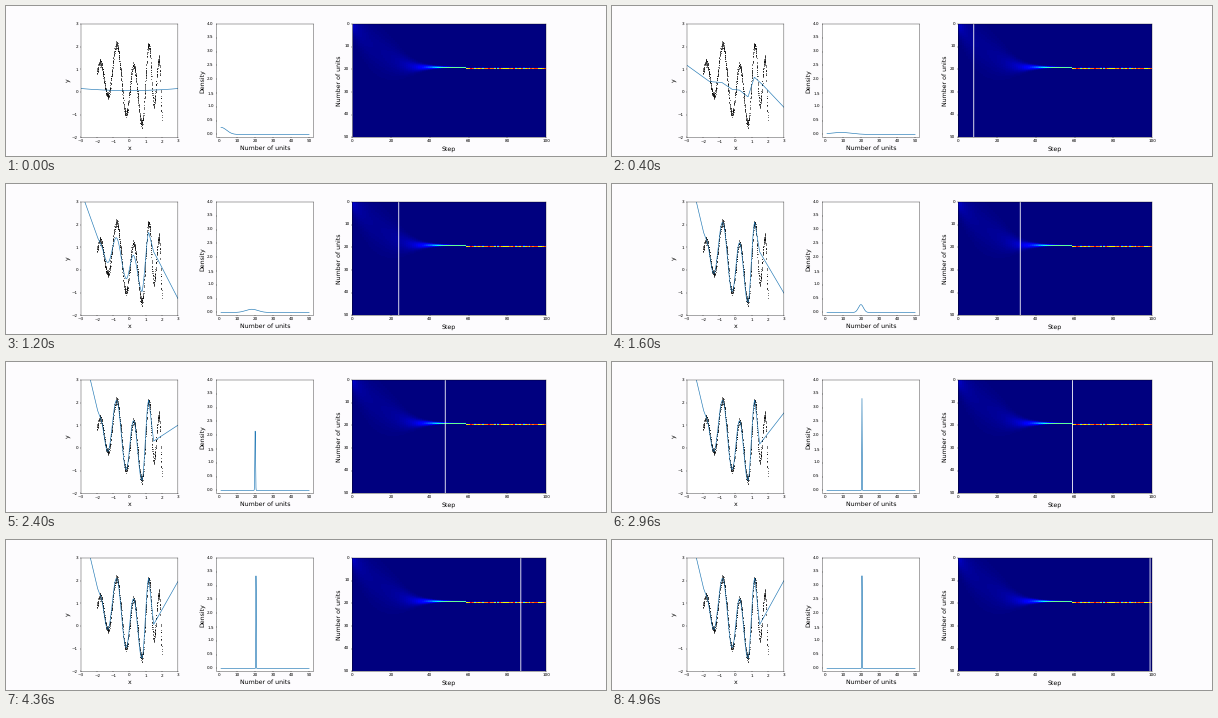
A matplotlib script for the animation above (5 s loop, 600 by 150 pixels).

```python
import math

import matplotlib.pyplot as plt
import numpy as np
from matplotlib.animation import FuncAnimation

STEPS = 100
LOOP_MS = 5000

plt.rcParams.update({
    "font.family": "DejaVu Sans",
    "text.hinting": "none",
    "path.snap": False,
})
rng = np.random.default_rng(4)

# Turning points of the noisy signal
TURNS = [(-2.1, 0.6), (-1.83, 1.35), (-1.34, -0.15), (-0.8, 2.1), (-0.2, -0.95),
         (0.25, 1.2), (0.77, -1.42), (1.2, 2.1), (1.52, -0.55), (1.82, 1.45),
         (2.06, -1.6)]
TURN_X, TURN_Y = np.array(TURNS).T

# Coarse shape reached early in training
ROUGH = [(-3, 2.2), (-1.6, 0.83), (-0.85, 0.78), (-0.2, 0.17), (0.25, 0.1),
         (0.78, -0.5), (1.17, 1.23), (1.65, 0.6), (3, -1.5)]


def signal(x):
    """Half-cosine path through the turning points."""
    i = np.clip(np.searchsorted(TURN_X, x) - 1, 0, len(TURNS) - 2)
    u = (x - TURN_X[i]) / (TURN_X[i + 1] - TURN_X[i])
    return TURN_Y[i] + (TURN_Y[i + 1] - TURN_Y[i]) * (1 - np.cos(np.pi * u)) / 2


def polyline(x, points):
    return np.interp(x, *zip(*points))


grid = np.linspace(-3, 3, 361)
flat = 0.06 + 0.01 * grid ** 2
rough = polyline(grid, ROUGH)


def learned(step):
    """Follows the signal in the middle; the right tail swings up and settles."""
    lag = math.exp(-max(0, step - 32) / 14.7)
    left = [(-3, 4.75), (-1.97, 1.65), (-1.8, 1.34)]
    right = [(1.2, 2.1), (1.5, 0.05 + 0.75 * lag), (3, 2.03 - 3.05 * lag)]
    y = np.where(grid < -1.8, polyline(grid, left), signal(grid))
    return np.where(grid > 1.2, polyline(grid, right), y)


def fit(step):
    early = min(step / 16, 1)
    late = np.clip((step - 16) / 16, 0, 1)
    coarse = flat + early * (rough - flat)
    return coarse + late * (learned(step) - coarse)


units = np.linspace(1, 50, 500)


def density(step):
    """Normal density cut off below one unit."""
    if step < 59:
        mean = 20 - 19 * max(0, 1 - step / 35) ** 2
    else:
        mean = 20.45 + rng.normal(0, 0.025)
    sd = 0.116 + 3 * (1 + step / 6) * math.exp(-(step / 19.5) ** 2)
    mass = 0.5 * (1 + math.erf((mean - 1) / (sd * math.sqrt(2))))
    peak = 1 / (sd * math.sqrt(2 * math.pi) * mass)
    return peak * np.exp(-0.5 * ((units - mean) / sd) ** 2)


densities = np.array([density(s) for s in range(STEPS)])

fig, (ax_fit, ax_den, ax_map) = plt.subplots(
    1, 3, figsize=(20, 5), dpi=30, facecolor="#fdfcfe",
    gridspec_kw=dict(width_ratios=[1, 1, 2], wspace=0.3,
                     left=0.125, right=0.9, bottom=0.125, top=0.88))


def label(ax, xlabel, ylabel):
    ax.set_xlabel(xlabel, fontsize=15)
    ax.set_ylabel(ylabel, fontsize=15)


data_x = rng.uniform(-2, 2, 1000)
data_y = signal(data_x) + rng.normal(0, 0.09, data_x.size)
ax_fit.plot(data_x, data_y, "k.", ms=2, mew=0.8)
fit_line, = ax_fit.plot(grid, fit(0), color="C0")
ax_fit.set(xlim=(-3, 3), ylim=(-2, 3), xticks=range(-3, 4), yticks=range(-2, 4))
label(ax_fit, "x", "y")

den_line, = ax_den.plot(units, densities[0], color="C0")
ax_den.set(xlim=(-1.45, 52.45), ylim=(-0.1, 4), xticks=range(0, 51, 10),
           yticks=np.arange(0, 4.1, 0.5))
label(ax_den, "Number of units", "Density")

ax_map.imshow(densities.T, cmap="jet", aspect="auto", interpolation="nearest",
              vmin=0, extent=(0, 100, 50, 0))
cursor = ax_map.axvline(0, color="white", lw=2)
ax_map.set(xlim=(0, 100), ylim=(50, 0), xticks=range(0, 101, 20),
           yticks=range(0, 51, 10))
label(ax_map, "Step", "Number of units")


def update(step):
    fit_line.set_ydata(fit(step))
    den_line.set_ydata(densities[step])
    cursor.set_xdata([step, step])
    return fit_line, den_line, cursor


anim = FuncAnimation(fig, update, frames=STEPS, interval=LOOP_MS / STEPS,
                     repeat=True, repeat_delay=0)
plt.show()
```
